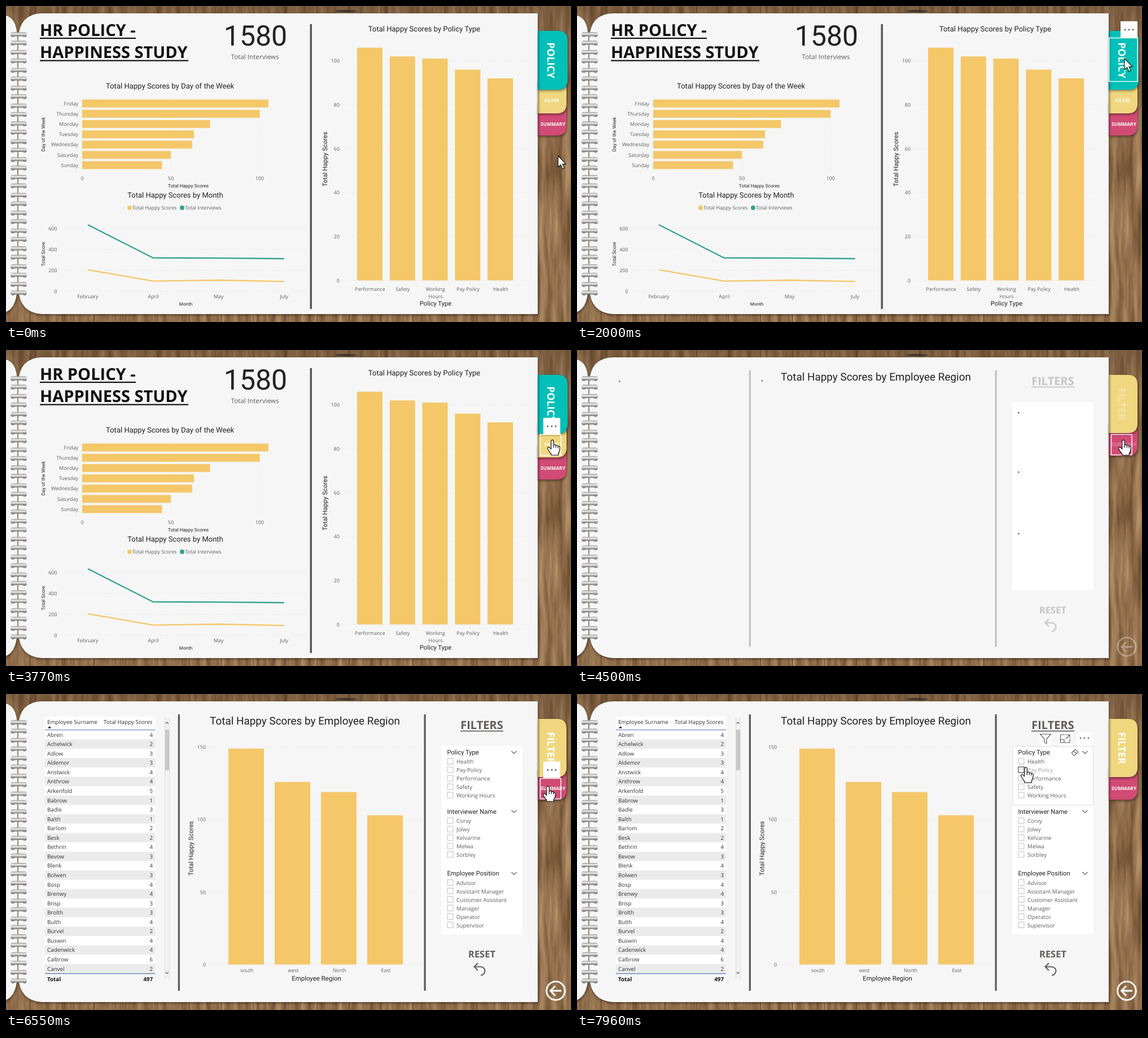
Animation, 1001 px wide and 559 px high, one loop 8000 ms. Source, as an HTML page:

```html
<!DOCTYPE html>
<html lang="en">
<head>
<meta charset="utf-8">
<title>HR policy notebook</title>
<style>
html, body { margin: 0; width: 100%; height: 100%; overflow: hidden; background: #94704b; }
svg { position: absolute; left: 0; top: 0; width: 1001px; height: 559px; }
text { font-family: "Open Sans", "Noto Sans", sans-serif; fill: #605e5c; text-rendering: geometricPrecision; white-space: pre; }
.din { font-family: Roboto, sans-serif; fill: #222; }
.bold { font-weight: 700; }
.mid { text-anchor: middle; }
.end { text-anchor: end; }
.ink { fill: #111; }
.cell { fill: #333; }
.white { fill: #fff; }
.grid { stroke: #d8d8d8; stroke-dasharray: 1 4.5; fill: none; }
.line { fill: none; stroke: #606060; stroke-width: 1.2; }
.shade { filter: drop-shadow(1.5px 2px 2px #0007); }

/* One loop is 8 s, so 1% is 80 ms. */
.timed { animation: 8s step-end infinite; }
@keyframes page1 { 0% { opacity: 1 } 56.25% { opacity: 0 } }
@keyframes page2 { 0% { opacity: 0 } 56.25% { opacity: 1 } }
@keyframes policyBox { 0% { opacity: 0 } 11.5% { opacity: 1 } 28.2% { opacity: 0 } 100% { opacity: 0 } }
@keyframes policyMenu { 0% { opacity: 0 } 14.1% { opacity: 1 } 28.2% { opacity: 0 } 100% { opacity: 0 } }
@keyframes filterBox { 0% { opacity: 0 } 29.2% { opacity: 1 } }
@keyframes filterMenu { 0% { opacity: 0 } 31.2% { opacity: 1 } }
@keyframes summaryBox { 0% { opacity: 1 } 84% { opacity: 0 } }
@keyframes summaryMenu { 0% { opacity: 0 } 81.8% { opacity: 1 } 84% { opacity: 0 } }
@keyframes fade { 0%, 56.25% { opacity: .32 } 60.8%, 100% { opacity: 1 } }
@keyframes loading { 0% { opacity: 1 } 58.6% { opacity: 0 } }
@keyframes loaded { 0% { opacity: 0 } 58.6% { opacity: 1 } }
@keyframes grow { 0%, 58.6% { transform: scaleY(0) } 63.4%, 100% { transform: scaleY(1) } }
@keyframes moreRows { 0% { opacity: 0 } 65.5% { opacity: 1 } }
@keyframes longThumb { 0% { opacity: 1 } 67.1% { opacity: 0 } }
@keyframes list1 { 0% { opacity: 0 } 67.1% { opacity: 1 } }
@keyframes list2 { 0% { opacity: 0 } 68.8% { opacity: 1 } }
@keyframes list3 { 0% { opacity: 0 } 70.4% { opacity: 1 } }
@keyframes slicer { 0% { opacity: 0 } 86.4% { opacity: 1 } }
@keyframes hoverBox { 0% { opacity: 0 } 92.5% { opacity: 1 } }
@keyframes hoverText { 0% { fill: #605e5c } 92.5% { fill: #a5a3a1 } }
@keyframes arrow { 0% { opacity: 1 } 30% { opacity: 0 } 84% { opacity: 1 } 89.4% { opacity: 0 } }
@keyframes hand { 0% { opacity: 0 } 30% { opacity: 1 } 84% { opacity: 0 } 89.4% { opacity: 1 } }
@keyframes pointer {
  0%, 5.4% { transform: translate(978px, 265px) }
  13.1% { transform: translate(971px, 102px) }
  15.75% { transform: translate(970px, 89px) }
  16.5%, 23.3% { transform: translate(970px, 87px) }
  32%, 81% { transform: translate(968px, 159px) }
  81.9% { transform: translate(960px, 163px) }
  91.6%, 92% { transform: translate(805px, 140px) }
  99.5%, 100% { transform: translate(795px, 129.5px) }
}
.fade { animation: fade 8s linear infinite; }
.grow { transform-box: fill-box; transform-origin: 50% 100%; animation: grow 8s ease-out infinite; }
.pointer { animation: pointer 8s ease-in-out infinite; }
</style>
</head>
<body>
<svg viewBox="0 0 1001 559">
  <defs>
    <filter id="wood" x="0" y="0" width="100%" height="100%" color-interpolation-filters="sRGB">
      <feTurbulence type="fractalNoise" baseFrequency=".09 .009" numOctaves="4" seed="8"/>
      <feColorMatrix values=".42 0 0 0 .36  .4 0 0 0 .235  .34 0 0 0 .13  0 0 0 0 1"/>
    </filter>
    <linearGradient id="metal" x2="0" y2="1">
      <stop offset="0" stop-color="#8e8c8a"/><stop offset=".35" stop-color="#f0f0f0"/>
      <stop offset=".65" stop-color="#bbb"/><stop offset="1" stop-color="#6e6c6a"/>
    </linearGradient>
    <linearGradient id="dusk" x2="0" y2="1">
      <stop offset="0" stop-color="#2a1c10" stop-opacity=".22"/><stop offset=".35" stop-color="#2a1c10" stop-opacity="0"/>
    </linearGradient>
  </defs>
  <rect width="1001" height="559" filter="url(#wood)"/>
  <rect width="1001" height="559" fill="url(#dusk)"/>
  <g id="planks"></g>
  <path d="M580 9q20-4 46 0q-24 4-46 0" fill="#3b3430"/>
  <g class="shade" fill="#f6f6f6">
    <path d="M-5 16Q20 18 20 58V500Q18 538-5 543Z"/>
    <path d="M942 13H62Q24 15 22 56V500Q24 543 64 545H942Z"/>
  </g>
  <g id="rings"></g>
</svg>
<svg viewBox="0 0 1001 559">
  <defs>
    <linearGradient id="fold">
      <stop offset="0" stop-opacity=".35"/><stop offset="1" stop-opacity="0"/>
    </linearGradient>
  </defs>
  <g id="policyPage" class="timed" style="animation-name:page1"></g>
  <g id="filterPage" class="timed" style="animation-name:page2"></g>
  <g class="pointer" stroke="#111" stroke-width="1.2" stroke-linejoin="round" fill="#fff">
    <path class="timed" style="animation-name:arrow" d="M0 0V20L4.6 15.8 8 23 11.2 21.5 8 14.6H14.2Z"/>
    <g class="timed" style="animation-name:hand">
      <path d="M-2.3 2.4a2.3 2.3 0 0 1 4.6 0V9q2.2-1.4 4 .8 2.4-1 3.6 1.2 3.4-.4 3.4 2.8 0 6-2.8 9.4V27H-2.3V24.5Q-6 20.5-8.3 15.8c-.8-2.8 2.2-3.8 4-1.6l2 2.2Z"/>
      <path d="M2.3 9v5M6.3 10v4M9.9 11.3v3.5" fill="none"/>
    </g>
  </g>
</svg>
<script>
const byId = id => document.getElementById(id);
const text = (s, x, y, size, cls = '', more = '') =>
  `<text x="${x}" y="${y}" font-size="${size}" class="${cls}" ${more}>${s}</text>`;
const turned = (s, x, y, size, angle, cls) =>
  text(s, 0, 0, size, 'mid ' + cls, `transform="translate(${x} ${y}) rotate(${angle})"`);
const rect = (x, y, w, h, fill, more = '') =>
  `<rect x="${x}" y="${y}" width="${w}" height="${h}" fill="${fill}" ${more}/>`;
const path = (d, more = '') => `<path d="${d}" ${more}/>`;
const timed = (name, body) => `<g class="timed" style="animation-name:${name}">${body}</g>`;
const each = (list, draw) => list.map(draw).join('');
const range = n => [...Array(n).keys()];

const tab = (y, h, right, fill) =>
  path(`M942 ${y}H${right - 17}q17 0 17 17V${y + h - 17}q0 17-17 17H942Z`, `fill="${fill}" class="shade"`);
// Shadow of the page edge on the tabs.
const fold = bottom => rect(942, 44, 5, bottom - 44, 'url(#fold)');
const outline = (x, y, w, h) => rect(x, y, w, h, 'none', 'stroke="#fff" stroke-width="1.4"');
const menu = (x, y) => rect(x, y, 30, 29, '#fff') +
  each([8, 15, 22], d => `<circle cx="${x + d}" cy="${y + 15}" r="1.4" fill="#555"/>`);

// Dotted rows with tick labels for a vertical axis.
const rows = (ticks, zero, unit, x1, x2, labelX) => each(ticks, v => {
  const y = zero - v * unit;
  return path(`M${x1} ${y}H${x2}`, 'class="grid"') + text(v, labelX, y + 3.2, 8.9, 'end');
});
const columns = (values, zero, unit, x, step, w) => each(values, (v, i) =>
  rect(x + i * step, zero - v * unit, w, v * unit, '#f4c769'));

function backdrop() {
  byId('planks').innerHTML = each(range(16), i =>
    rect(42 + i * 56.5, 0, 1.4, 559, '#3a2615', 'opacity=".5"'));
  byId('rings').innerHTML = rect(20, 50, 2, 456, '#a5825f') + each(range(30), i => {
    const y = 50 + 31.57 * (i >> 1) + 15 * (i % 2);
    const hole = x => `<ellipse cx="${x}" cy="${y + 1}" rx="4" ry="4" fill="#6b6764" opacity=".7"/>`;
    return hole(12) + hole(33) + rect(8, y - 3.5, 29, 7, 'url(#metal)', 'rx="3.5"');
  });
}

function policyPage() {
  const days = { Friday: 105, Thursday: 100, Monday: 72, Tuesday: 63, Wednesday: 62, Saturday: 50, Sunday: 45 };
  const months = ['February', 'April', 'May', 'July'];
  const policies = ['Performance', 'Safety', 'Working', 'Pay Policy', 'Health'];
  const monthX = i => 145 + i * 115.9;
  const series = (ys, color) => path('M' + ys.map((y, i) => `${monthX(i)} ${y}`).join('L'),
    `fill="none" stroke="${color}" stroke-width="2.3" stroke-linejoin="round"`);

  byId('policyPage').innerHTML =
    text('HR POLICY -', 60, 53, 29, 'bold ink') + rect(60, 56, 170, 2.2, '#111') +
    text('HAPPINESS STUDY', 60, 92, 29, 'bold ink') + rect(60, 95.5, 263, 2.2, '#111') +
    text('1580', 442, 70, 50, 'din mid') + text('Total Interviews', 441, 93.5, 11.7, 'mid') +
    rect(538.5, 32, 3.5, 504, '#595959') +

    text('Total Happy Scores by Day of the Week', 290.5, 145.5, 13.1, 'din mid') +
    each([0, 50, 100], v => {
      const x = 135 + v * 3.143;
      return path(`M${x} 162V293`, 'class="grid"') + text(v, x, 308, 8.9, 'mid');
    }) +
    each(Object.entries(days), ([day, v], i) => {
      const y = 172.5 + i * 18.17;
      return rect(135, y - 7, v * 3.143, 14, '#f4c769') + text(day, 128, y + 3.2, 8.95, 'end');
    }) +
    text('Total Happy Scores', 323, 320.5, 8.4, 'din mid') +
    turned('Day of the Week', 69, 227, 8.5, -90, 'din') +

    text('Total Happy Scores by Month', 300, 339, 13, 'din mid') +
    '<circle cx="219" cy="357" r="4" fill="#f4c769"/><circle cx="312" cy="357" r="4" fill="#33a291"/>' +
    text('Total Happy Scores', 224, 360.2, 8.9) + text('Total Interviews', 317, 360.2, 8.9) +
    rows([0, 200, 400, 600], 504.5, .185, 98, 537, 90.5) +
    each(months, (m, i) => text(m, monthX(i), 517, 8.9, 'mid')) +
    series([387, 445.7, 445.8, 447], '#33a291') + series([466.7, 486.7, 485, 487.4], '#f4c769') +
    text('Month', 318.5, 530, 8.1, 'din mid') + turned('Total Score', 69, 439, 8.6, -90, 'din') +

    text('Total Happy Scores by Policy Type', 741, 44.5, 13.05, 'din mid') +
    rows([0, 20, 40, 60, 80, 100], 485.5, 3.885, 597, 923, 591) +
    columns([106, 102, 101, 96, 92], 485.5, 3.885, 622, 57.8, 45) +
    each(policies, (p, i) => text(p, 645 + i * 57.9, 504, 8.8, 'mid')) + text('Hours', 761, 516.5, 8.8, 'mid') +
    text('Policy Type', 761, 529.5, 11.2, 'din mid') +
    turned('Total Happy Scores', 569, 271, 11.25, -90, 'din') +

    tab(170, 59, 993, '#d14b74') + tab(130, 60, 993, '#f0d77f') + tab(44, 104, 995, '#00c0b8') + fold(229) +
    turned('POLICY', 958.6, 96, 17.8, 90, 'bold white') +
    text('FILTER', 967, 170.3, 8, 'bold white mid') + text('SUMMARY', 969, 212, 8.5, 'bold white mid') +
    timed('policyBox', outline(943, 56.5, 50, 77)) + timed('policyMenu', menu(963, 27)) +
    timed('filterBox', outline(946.5, 149.5, 36.5, 37)) + timed('filterMenu', menu(952, 120));
}

function filterPage() {
  const surnames = ('Abren Achelwick Adlow Aldemor Anstwick Anthrow Arkenfold Babrow Badle Balth Barlom Besk ' +
    'Bethrin Bevow Blenk Bolwen Bosp Brenwy Brisp Brolth Bulth Burvel Buswin Cadenwick Calbrow Canvel').split(' ');
  const scores = '42334451312243434433424462';
  const rowsDrawn = surnames.map((name, i) => {
    const y = 72 + i * 16.56;
    return rect(69, y - 8.28, 195, 16.56, i % 2 ? '#ebebeb' : '#fff') +
      text(name, 73, y + 3.6, 9.8, 'cell') + text(scores[i], 260, y + 3.6, 9.8, 'cell end');
  });
  const slicers = [
    ['Policy Type', 103, 119.5, ['Health', 'Pay Policy', 'Performance', 'Safety', 'Working Hours']],
    ['Interviewer Name', 207.5, 224.5, ['Corvy', 'Jolwy', 'Kelvarine', 'Melwa', 'Sorbley']],
    ['Employee Position', 317, 334, ['Advisor', 'Assistant Manager', 'Customer Assistant', 'Manager', 'Operator', 'Supervisor']],
  ];
  const box = (y, color) => rect(782, y - 5.5, 10, 10, '#fff', `stroke="${color}"`);
  const chevron = y => path(`M895.5 ${y - 2}l4.5 4.5 4.5-4.5`, 'class="line"');
  const slicer = ([title, y, top, items], n) =>
    timed('loaded', text(title, 781.5, y + 4, 11.2, 'din') + chevron(y)) +
    timed('list' + (n + 1), each(items, (item, i) => {
      const hover = item === 'Pay Policy';
      return box(top + i * 15, '#c0c0c0') + text(item, 798, top + 3.7 + i * 15, 9.85,
        hover ? 'timed' : '', hover ? 'style="animation-name:hoverText"' : '');
    }));
  const dot = (x, y) => `<circle cx="${x}" cy="${y}" r="1.3" fill="#555"/>`;

  const table =
    rect(69, 40, 195, 23, '#fff') +
    text('Employee Surname', 73, 53, 9.8, 'cell') + text('Total Happy Scores', 259.5, 53, 9.8, 'cell end') +
    path('M73.5 60.5l3.5-3.5 3.5 3.5Z', 'fill="#222"') +
    rowsDrawn.slice(0, 20).join('') + timed('moreRows', rowsDrawn.slice(20).join('')) +
    rect(69, 63, 195, 1, '#4f78b5') + rect(69, 494, 195, 1.2, '#4f78b5') +
    text('Total', 73, 507.5, 9.8, 'bold ink') + text('497', 260, 507.5, 9.8, 'bold ink end') +
    rect(281.5, 42, 8, 462, '#f2f2f2') + path('M281.5 42V504M289.5 42V504', 'stroke="#dedede"') +
    path('M282.8 52.5l2.5-2.7 2.5 2.7M282.8 492l2.5 2.7 2.5-2.7', 'class="line"') +
    rect(282, 63, 7, 72, '#c8c8c8') + timed('longThumb', rect(282, 63, 7, 272, '#c8c8c8'));

  const chart =
    rows([0, 50, 100, 150], 478.5, 2.563, 360, 738, 354) +
    `<g class="grow">${columns([149, 126, 119, 103], 478.5, 2.563, 394, 82, 63)}</g>` +
    each(['south', 'west', 'North', 'East'], (r, i) => text(r, 427 + i * 82, 491.5, 8.8, 'mid')) +
    text('Employee Region', 550, 507, 11.45, 'din mid') +
    turned('Total Happy Scores', 331.5, 273, 11.2, -90, 'din');

  const headerIcons =
    rect(819, 67, 22, 25, '#fff', 'opacity=".8"') + rect(853, 67, 24, 25, '#fff', 'opacity=".8"') +
    rect(885, 67, 29, 25, '#fff', 'opacity=".8"') +
    path('M820.5 71h19l-7.5 8.5v8l-4-2.5v-5.5Z', 'class="line"') +
    path('M864 72h-7.5v14h16.5v-6M866 72h7v6M873 72l-7 7M857 80.5h6v5', 'class="line"') +
    each([892, 899, 906], x => dot(x, 78)) +
    rect(771.5, 92.5, 143, 104, 'none', 'stroke="#dcdcdc"') +
    path('M876.5 104l6-6 5.5 4.5-6 6h-2.5ZM879.5 101l5.5 4.5', 'class="line"');

  byId('filterPage').innerHTML =
    text('Total Happy Scores by Employee Region', 529.5, 53.5, 18.9, 'din mid') +
    rect(771, 92, 144, 333.5, '#fff') +
    tab(130, 57, 993, '#d14b74') + tab(44, 103, 993, '#f0d77f') + fold(187) +
    '<g class="fade">' +
    rect(304.7, 36, 3.3, 489, '#5c5c5c') + rect(740.5, 36, 3.3, 489, '#5c5c5c') +
    text('FILTERS', 843, 62, 20, 'bold mid') + rect(805, 64.7, 76, 1.7, '#605e5c') +
    text('RESET', 843, 465.5, 16.5, 'bold mid') +
    path('M836 476l-6.5 6.5 6.5 6.5M830 482.5h11a7.5 7.5 0 0 1 0 15', 'fill="none" stroke="#605e5c" stroke-width="2.1"') +
    turned('FILTER', 958.8, 95.5, 17.6, 90, 'bold white') + text('SUMMARY', 969, 170.3, 8.5, 'bold white mid') +
    '<g fill="none" stroke="#fff" stroke-width="2.8"><circle cx="974" cy="525" r="16.3"/>' +
    path('M984 525H965M973 516.5l-8.5 8.5 8.5 8.5') + '</g></g>' +
    timed('loading', dot(75.5, 55.5) + dot(328, 54.5) + dot(782.5, 111) + dot(782.5, 216) + dot(782.5, 325)) +
    timed('loaded', table + chart) + each(slicers, slicer) +
    timed('slicer', headerIcons) + timed('hoverBox', box(134.5, '#333')) +
    timed('summaryBox', outline(946.5, 149.5, 36.5, 36)) + timed('summaryMenu', menu(952, 119.5));
}

backdrop();
policyPage();
filterPage();
</script>
</body>
</html>
```
